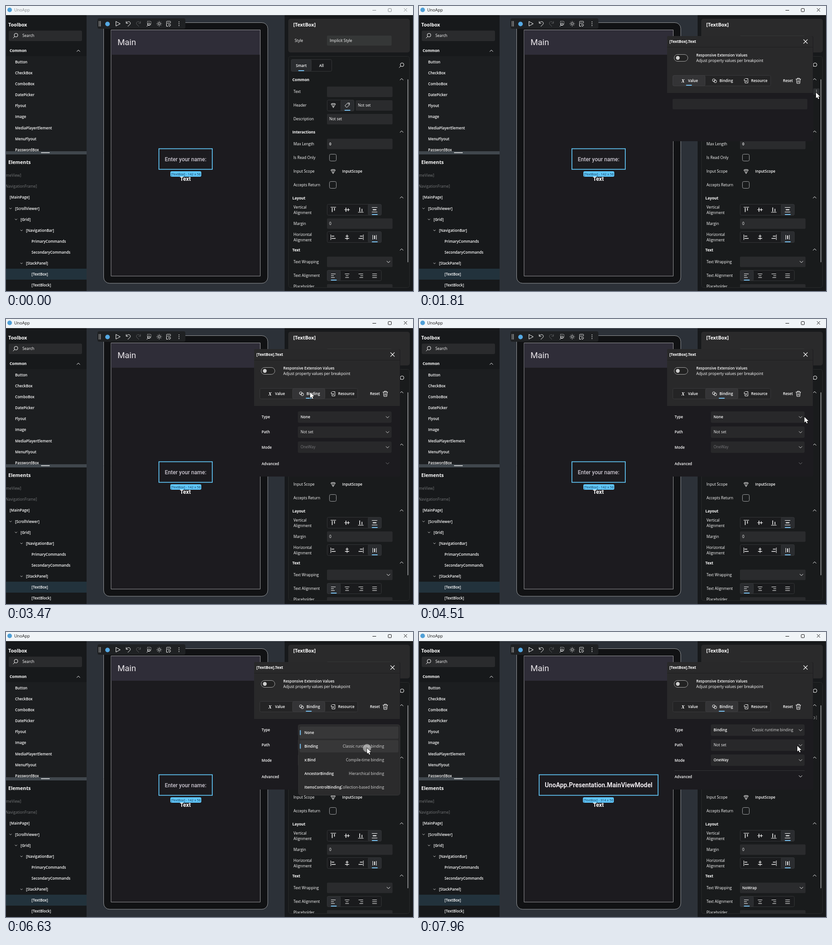
An HTML page with a canvas for the animation above (8000 ms loop, 894 by 626 pixels).

```html
<!DOCTYPE html>
<html lang="en">
<head>
<meta charset="utf-8">
<title>UnoApp</title>
<style>
html, body { margin: 0; width: 100%; height: 100%; overflow: hidden; background: #17191b; }
canvas { display: block; width: 894px; height: 626px; }
</style>
</head>
<body>
<canvas id="stage" width="894" height="626"></canvas>
<script>
const g = document.getElementById('stage').getContext('2d');
const LOOP = 8000;
const SANS = '"Open Sans", sans-serif', ROBOTO = 'Roboto, sans-serif';
const WHITE = '#fff', SOFT = '#d8d8d8', ACCENT = '#76c0f0', FIELD = '#2a2b2d', EDGE = '#343638';

// Moments at which the interface changes state
const AT = { focus: 1470, popup: 1710, binding: 3400, list: 4800, chosen: 6780, refreshed: 7350 };
const PRESSES = [[1470, 1570], [3300, 3400], [4700, 4800], [6630, 6780]];
const PATH = [
  [320, 716, 630], [770, 846, 209], [930, 868, 177], [1060, 871, 183],
  [1160, 871, 183], [1320, 872, 190], [2120, 872, 190], [2600, 668, 160],
  [2770, 668, 160], [2900, 668, 161], [3880, 668, 161], [4420, 849, 214],
  [4670, 841, 217], [5660, 841, 217], [6040, 793, 254], [6320, 793, 255],
  [7290, 793, 255], [7960, 831, 250]
];

function box(x, y, w, h, fill, r = 0, stroke) {
  g.beginPath();
  if (stroke) g.roundRect(x + .5, y + .5, w - 1, h - 1, r);
  else g.roundRect(x, y, w, h, r);
  if (fill) { g.fillStyle = fill; g.fill(); }
  if (stroke) { g.strokeStyle = stroke; g.lineWidth = 1; g.stroke(); }
}

function text(s, x, y, { color = WHITE, size = 8.35, weight = 400, font = SANS, align = 'left' } = {}) {
  g.font = `${weight} ${size}px ${font}`;
  g.textAlign = align;
  g.fillStyle = color;
  g.fillText(s, x, y + size * .357);
}

const heading = (s, x, y, size = 8.3) => text(s, x, y, { weight: 700, size });
const item = (s, x, y, align) => text(s, x, y, { weight: 600, size: 8.15, align });

function line(pts, color = WHITE, width = 1) {
  g.beginPath();
  for (let i = 0; i < pts.length; i += 2) g.lineTo(pts[i], pts[i + 1]);
  g.strokeStyle = color;
  g.lineWidth = width;
  g.stroke();
}

function arc(x, y, r, color = WHITE, from = 0, to = 7, width = 1) {
  g.beginPath();
  g.arc(x, y, r, from, Math.min(to, from + Math.PI * 2));
  g.strokeStyle = color;
  g.lineWidth = width;
  g.stroke();
}

function disc(x, y, r, color) {
  g.beginPath();
  g.arc(x, y, r, 0, Math.PI * 2);
  g.fillStyle = color;
  g.fill();
}

// dir: 1 points down, -1 points up
const chevron = (x, y, dir, color = WHITE, w = 3.6) =>
  line([x - w, y - dir * w / 2, x, y + dir * w / 2, x + w, y - dir * w / 2], color);

const dots = (x, y, gap = 3, r = .8) => [-gap, 0, gap].forEach(d => disc(x, y + d, r, SOFT));

function magnifier(x, y) {
  arc(x + 1, y - 1, 4);
  line([x - 2, y + 2, x - 5.5, y + 5.5]);
}

function gem(x, y) {
  line([x - 5, y - 3, x - 3, y - 4.5, x + 3, y - 4.5, x + 5, y - 3, x, y + 5, x - 5, y - 3, x + 5, y - 3], SOFT, .9);
  line([x - 2, y - 3, x, y + 4, x + 2, y - 3], SOFT, .8);
}

function tag(x, y) {
  line([x - 5, y + 1, x + 1, y - 5, x + 5, y - 5, x + 5, y - 1, x - 1, y + 5, x - 5, y + 1]);
  disc(x + 2.7, y - 2.7, .9, WHITE);
}

function titleBar(active) {
  const ink = active ? '#111' : '#858a8e';
  box(0, 0, 894, 20, '#f0f4f7');
  disc(8, 8.5, 5, '#4f9fd6');
  text('UnoApp', 18, 9, { color: ink, size: 9 });
  line([805, 9.5, 813, 9.5], ink);
  box(839, 5, 8, 8, null, 1, ink);
  line([874, 5, 881, 12], ink);
  line([881, 5, 874, 12], ink);
}

function leftPanel() {
  box(0, 20, 177, 606, '#17191b');
  heading('Toolbox', 5, 41, 10.7);
  box(6, 54, 161, 23, FIELD, 3);
  magnifier(21, 65);
  text('Search', 36, 65.5);
  box(0, 110, 177, 209, '#1c1e20');
  heading('Common', 8, 98.5);
  chevron(159, 98.5, -1);
  ['Button', 'CheckBox', 'ComboBox', 'DatePicker', 'Flyout', 'Image', 'MediaPlayerElement', 'MenuFlyout', 'PasswordBox']
    .forEach((s, i) => item(s, 20, 123 + i * 24.1));
  box(0, 319, 177, 7, '#40474d');
  box(0, 326, 177, 300, '#17191b');
  box(77, 321.5, 19, 1.5, '#eee');
  heading('Elements', 5, 343, 10.7);
  box(0, 577, 177, 24, '#22323c');
  const dim = { color: '#747678' };
  text('meView]', 0, 372, dim);
  text('NavigationFrame]', -1, 396, dim);
  const tree = [['[MainPage]', 8], ['[ScrollViewer]', 20, 1], ['[Grid]', 32, 1], ['[NavigationBar]', 44, 1],
    ['PrimaryCommands', 56], ['SecondaryCommands', 56], ['[StackPanel]', 44, 1], ['[TextBox]', 56], ['[TextBlock]', 56]];
  tree.forEach(([s, x, open], i) => {
    const y = 420.5 + i * 24.1;
    item(s, x, y);
    if (open) chevron(x - 10, y, 1, '#ccc', 2.4);
  });
}

function toolbar() {
  box(201, 27, 193, 23, '#1f2123', 4);
  line([204.5, 33, 204.5, 45], '#ccc');
  line([207.5, 33, 207.5, 45], '#ccc');
  disc(223, 39.5, 5, '#55a9e4');
  line([241.5, 34, 251, 39, 241.5, 44, 241.5, 33.5]);
  const turn = (x, dir, color) => {
    line([x - 4.5 * dir, 33.5, x - 4.5 * dir, 38, x, 38], color);
    g.beginPath();
    g.moveTo(x - 4.5 * dir, 38);
    g.bezierCurveTo(x - dir, 31, x + 7 * dir, 35, x + 4 * dir, 40);
    g.lineTo(x - dir, 45);
    g.stroke();
  };
  turn(268.5, 1, WHITE);
  turn(291, -1, '#5c5e60');
  g.setLineDash([2, 1.5]);
  box(310, 33, 9, 9, null, 1, '#e8e8e8');
  g.setLineDash([]);
  arc(314, 40, 2.6);
  line([312, 42, 309, 45]);
  arc(336.5, 39, 2.5);
  for (let a = 0; a < 8; a++) {
    const c = Math.cos(a * Math.PI / 4), s = Math.sin(a * Math.PI / 4);
    line([336.5 + c * 4.2, 39 + s * 4.2, 336.5 + c * 5.7, 39 + s * 5.7]);
  }
  box(352, 33, 10, 5, null, 1, '#eee');
  line([352.5, 38, 352.5, 44.5, 356, 44.5]);
  line([356, 41, 362, 41]);
  line([357, 43, 359, 45, 362, 42]);
  dots(380, 39, 4, 1);
}

function canvasArea(refreshed) {
  box(177, 20, 435, 606, '#2c3138');
  box(214, 36, 361.5, 573.5, '#111214', 13, '#96999c');
  box(230.3, 52, 328.7, 541.7, '#1c1b1f', 0, '#98989b');
  box(231, 53, 327, 54, '#2f2d38');
  text('Main', 245, 79.5, { size: 18.4, font: ROBOTO, color: '#ece8ec' });
  toolbar();
  const mid = 394.5, w = refreshed ? 263 : 119;
  g.strokeStyle = '#62c8fa';
  g.lineWidth = 1.7;
  g.strokeRect(mid - w / 2 + .85, 313.5, w - 1.7, 45.2);
  const value = { weight: 500, font: ROBOTO, align: 'center' };
  if (refreshed) text('UnoApp.Presentation.MainViewModel', mid, 336.5, { ...value, weight: 600, size: 13.8, color: '#ece8ec' });
  else text('Enter your name:', mid, 336.5, { ...value, size: 12.1, color: '#cac5cf' });
  text('Text', 394, 380, { ...value, weight: 600, size: 12.1 });
  box(refreshed ? 360 : 361, 363, 68, 12, '#5fc6fb', 3);
  text(`[TextBox] - ${refreshed ? 314 : 142} x 56`, refreshed ? 394 : 395, 369.5, { size: 7.2, color: '#15384c', align: 'center' });
}

function segments(x, y, w, h, count, selected) {
  box(x, y, w * count, h, '#1a1b1d', 3, EDGE);
  box(x + w * selected, y, w, h, '#2a2c2f', 3, EDGE);
  box(x + w * (selected + .5) - 6.5, y + h - 3, 13, 2, ACCENT, 1);
}

function field(y, value, x = 705, w = 144) {
  box(x, y - 11.5, w, 23, FIELD, 2);
  if (value) text(value, x + 5, y);
}

function checkbox(y) { box(710, y - 8, 16, 16, null, 3, '#a0a2a4'); }

// Bars against an edge; the same drawing serves both directions
function alignIcons(y, vertical) {
  for (let i = 0; i < 4; i++) {
    g.save();
    g.translate(719 + i * 30.2, y);
    if (vertical) g.rotate(Math.PI / 2);
    if (i === 3) {
      const reach = vertical ? [5, 6] : [4, 5];
      for (const side of [-1, 1]) line([side * reach[0], -reach[1], side * reach[0], reach[1]]);
      line([0, -4, 0, 4], WHITE, 2);
    } else {
      const edge = [-5.5, 0, 5.5][i];
      line([edge, -6, edge, 6]);
      for (const [d, len] of [[-2.5, 6], [2.5, 9]]) {
        const from = [-4, -len / 2, 4 - len][i];
        line([from, d, from + len, d], WHITE, 1.5);
      }
    }
    g.restore();
  }
}

function textAlignIcons(y) {
  for (let i = 0; i < 4; i++) {
    [10, i === 3 ? 10 : 6, i === 3 ? 10 : 8].forEach((w, k) => {
      const x = 719 + i * 30.2 + [-5, -w / 2, 5 - w, -5][i];
      line([x, y - 3.5 + k * 4, x + w, y - 3.5 + k * 4]);
    });
  }
}

const ROWS = [188, 218, 248, 303, 333, 363, 393, 448, 478, 508, 562, 592];

function rightPanel(t, cursor) {
  const refreshed = t >= AT.refreshed;
  box(612, 20, 282, 606, '#17191b');
  box(620, 28, 267, 74, '#2a2a2b', 5);
  heading('[TextBox]', 631, 41.5, 10.7);
  text('Style', 634, 76);
  box(705, 65, 142, 22, '#353737', 2);
  text('Implicit Style', 711, 76);

  box(620, 110, 267, 509, '#191b1c', 5, '#292b2c');
  segments(626, 117, 45, 27, 2, 0);
  item('Smart', 648.5, 131, 'center');
  item('All', 693, 131, 'center');
  magnifier(869, 130);
  [['Common', 162], ['Interactions', 277], ['Layout', 421.5], ['Text', 536]].forEach(([s, y]) => {
    heading(s, 629, y + .5);
    chevron(869, y - 1, -1);
  });
  box(882, 161, 1.6, 402, '#a0a2a3', 1);

  ['Text', 'Header', 'Description', 'Max Length', 'Is Read Only', 'Input Scope', 'Accepts Return', '', 'Margin', '', 'Text Wrapping', 'Text Alignment']
    .forEach((s, i) => text(s, 631.5, ROWS[i] + .5));
  text('Vertical', 631.5, 442);
  text('Alignment', 631.5, 454);
  text('Horizontal', 631.5, 502.5);
  text('Alignment', 631.5, 514);

  field(188.5);
  segments(705, 206, 30, 25, 2, 1);
  gem(719, 218.5);
  tag(749.5, 218);
  field(218.5, 'Not set', 768, 81);
  field(248.5, 'Not set');
  field(303);
  item('0', 710, 303);
  checkbox(333);
  gem(718.5, 363.5);
  item('InputScope', 738.5, 363.5);
  checkbox(393);
  segments(705, 435, 30, 25, 4, 3);
  alignIcons(447.5, true);
  field(478, '0');
  segments(705, 495, 30, 25, 4, 3);
  alignIcons(508, false);
  field(562);
  if (refreshed) item('NoWrap', 710, 562);
  chevron(840, 562, 1);
  segments(705, 580, 30, 24, 4, 0);
  textAlignIcons(592);

  g.save();
  g.beginPath();
  g.rect(620, 606, 267, 12);
  g.clip();
  text('Placeholder', 631.5, 616.5);
  box(705, 611, 144, 10, FIELD, 2);
  g.restore();

  if (refreshed) {
    arc(867, 188.5, 2.6, '#b0b0b0', -1.6, 1.6);
    dots(873, 188, 3, .7);
  } else if (cursor && cursor.x > 640 && t < 2200) {
    const row = ROWS.find(y => Math.abs(cursor.y - y) < 15);
    if (row && cursor.x > 862) box(866, row - 7, 14, 14, '#2d2f31', 2);
    if (row) dots(873, row);
  }
}

function linkIcon(x, y) {
  arc(x - 1.5, y - 1, 3);
  arc(x + 1.8, y + 1.5, 3);
}

function combo(y, value, color, note) {
  box(641, y - 12.5, 206, 25, '#28282a', 3);
  if (color) text(value, 647, y, { color });
  else item(value, 647, y);
  if (note) text(note, 822, y, { color: SOFT, align: 'right' });
  chevron(838, y, 1, SOFT);
}

function popup(t) {
  const binding = t >= AT.binding, bound = t >= AT.chosen, refreshed = t >= AT.refreshed;
  box(545, 66, 321, binding ? 280 : 231, '#1c1b1f', 4);
  box(545, 66, 320, 125, '#29292a', [4, 4, 0, 0]);
  line([545, 90.5, 865, 90.5], '#1f1f20');
  heading('[TextBox].Text', 550, 78, 8.5);
  line([844.5, 73.5, 853.5, 82.5], WHITE, 1.1);
  line([853.5, 73.5, 844.5, 82.5], WHITE, 1.1);
  box(560, 106, 31, 16, '#222', 7.5, '#a4a4a4');
  disc(568.5, 114, 4.2, '#cfcfcf');
  item('Responsive Extension Values', 609, 108.5);
  text('Adjust property values per breakpoint', 609, 120);

  const tab = binding ? 1 : 0;
  box(557, 152, 216, 24, '#242425', 3, '#38383a');
  box(557 + tab * 72, 152, 72, 24, '#343436', 3, '#3e3e40');
  box(586.5 + tab * 72, 173, 13, 2, ACCENT, 1);
  text('X', 580, 164, { font: '"Liberation Serif", serif', size: 11, weight: 'italic 700', align: 'center' });
  item('Value', 591, 164.5);
  linkIcon(649, 164);
  item('Binding', 660, 164.5);
  line([717, 159.5, 722.5, 159.5, 722.5, 169, 716, 169, 716, 166]);
  line([716, 159.5, 714.5, 161, 714.5, 164.5, 718, 164.5]);
  disc(719, 165, 1.2, WHITE);
  item('Resource', 729.5, 164.5);
  item('Reset', 799.5, 164.5);
  line([827.5, 160.5, 839, 160.5]);
  line([831, 160, 831, 158.5, 835.5, 158.5, 835.5, 160]);
  line([829, 161, 830, 170, 836.5, 170, 837.5, 161]);
  line([832, 163, 832, 168]);
  line([834.6, 163, 834.6, 168]);

  if (!binding) {
    box(557, 204, 296, 23, '#28282a', 2);
    return;
  }
  [['Type', 215.5], ['Path', 248.5], ['Mode', 282], ['Advanced', 318]].forEach(([s, y]) => item(s, 561.5, y));
  const dim = '#77777a';
  combo(215.5, bound ? 'Binding' : 'None', null, bound && 'Classic runtime binding');
  combo(248.5, 'Not set', '#f0f0f0');
  combo(281.5, 'OneWay', refreshed ? null : dim);
  if (refreshed) line([561, 304.5, 847, 304.5], '#333336');
  chevron(838, 317, 1, refreshed ? WHITE : dim);
}

function dropdown(t, cursor) {
  const p = Math.min(1, (t - AT.list) / 250), grow = 1 - (1 - p) ** 3;
  g.save();
  g.beginPath();
  g.rect(641, 202, 226, 32 + 127 * grow);
  g.clip();
  box(642, 203, 224, 156, '#2b2b2c', 5, '#343436');
  const hover = cursor.y >= 236 ? 1 : 0;
  [['None', ''], ['Binding', 'Classic runtime binding'], ['x:Bind', 'Compile-time binding'],
    ['AncestorBinding', 'Hierarchical binding'], ['ItemsControlBinding', 'Collection-based binding']].forEach(([name, note], i) => {
    const y = 221 + i * 30.1;
    if (i === 0 || i === hover) {
      box(645, y - 13.5, 217, 27, '#373738', 3);
      box(645.5, y - 5.5, 2, 11, ACCENT, 1);
    }
    item(name, 655.5, y);
    text(note, 830.5, y, { color: SOFT, align: 'right' });
  });
  g.restore();
}

function cursorAt(t) {
  if (t < PATH[0][0]) return null;
  const next = PATH.findIndex(k => k[0] > t);
  if (next < 0) return { x: PATH.at(-1)[1], y: PATH.at(-1)[2] };
  const [t0, x0, y0] = PATH[next - 1], [t1, x1, y1] = PATH[next];
  const p = (t - t0) / (t1 - t0), e = p * p * (3 - 2 * p);
  return { x: x0 + (x1 - x0) * e, y: y0 + (y1 - y0) * e };
}

function drawCursor(t, { x, y }) {
  if (PRESSES.some(([a, b]) => t >= a && t < b)) disc(x, y, 9, 'rgba(205,205,205,.65)');
  g.beginPath();
  for (const [dx, dy] of [[0, 0], [0, 12.6], [2.9, 9.9], [4.9, 14.4], [7, 13.5], [5, 9.1], [9, 9.1]]) g.lineTo(x + dx, y + dy);
  g.closePath();
  g.lineWidth = 1.2;
  g.strokeStyle = '#000';
  g.stroke();
  g.fillStyle = '#fff';
  g.fill();
}

function frame() {
  const t = performance.now() % LOOP, cursor = cursorAt(t);
  leftPanel();
  canvasArea(t >= AT.refreshed);
  rightPanel(t, cursor);
  titleBar(t >= AT.focus);
  if (t >= AT.popup) popup(t);
  if (t >= AT.list && t < AT.chosen) dropdown(t, cursor);
  if (cursor) drawCursor(t, cursor);
  requestAnimationFrame(frame);
}
frame();
</script>
</body>
</html>
```
